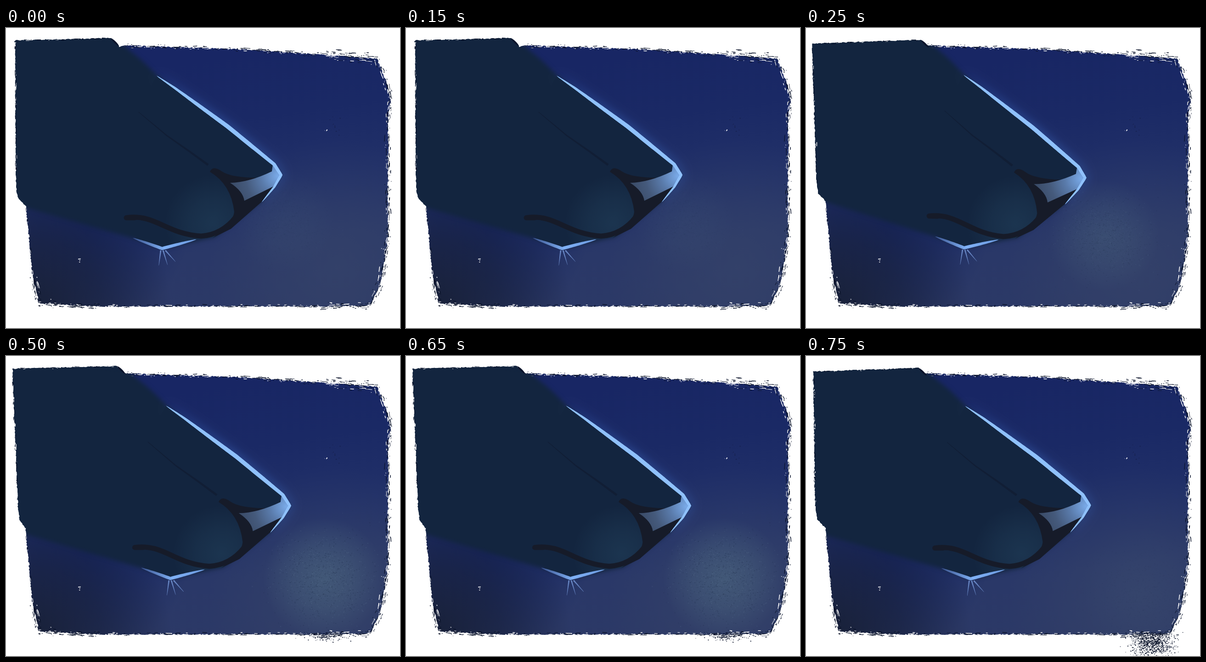
Write an HTML page with a canvas that moves like this. It is 858 px wide and 653 px high and loops after 1 s.

```html
<!DOCTYPE html>
<html lang="en">
<head>
<meta charset="utf-8">
<title>Night muzzle</title>
<style>
html, body { margin: 0; width: 100%; height: 100%; overflow: hidden; background: #fff; }
canvas { display: block; }
</style>
</head>
<body>
<canvas id="stage" width="858" height="653"></canvas>
<script>
const W = 858, H = 653, HOLD = 250;
const INK = '#0b142b', HIDE = '#13253f', DARK = '#161b29', RIM = '#8fc1fc';

// Head shift and turn, neck corners, strength of the breath and of its spill below the panel
const POSES = [
  { shift: [0, 0], turn: 0, top: [20, 27], notch: [228, 22], hip: [22, 346], foot: [43, 387], breath: .13, spill: 0 },
  { shift: [9.3, 0], turn: .029, top: [13, 34], notch: [250, 26], hip: [23, 335], foot: [42, 377], breath: .34, spill: 0 },
  { shift: [19, 4.5], turn: .006, top: [14, 28], notch: [242, 22], hip: [26, 325], foot: [42, 374], breath: .58, spill: 220 },
  { shift: [18.5, 5], turn: 0, top: [16, 34], notch: [245, 26], hip: [20, 322], foot: [42, 373], breath: .1, spill: 1300 }
];

// Panel corners, clockwise; the third value is how ragged the edge after it is
const PANEL = [
  [258, 38, 3], [500, 46, 3.5], [690, 58, 7], [808, 67, 5], [831, 125, 5], [838, 160, 5], [832, 190, 4],
  [832, 460, 5], [816, 555, 6], [793, 604, 5], [690, 606, 2], [200, 606, 5], [72, 599, 6],
  [58, 540, 1], [43, 385, 0], [60, 100, 0]
];

const RIM_LINE = [[328, 104], [368, 131], [482, 214], [584, 297], [599, 320], [584, 346], [557, 379]];
const NECK = new Path2D('M0 0 240 25 295 70 330 104 584 297 600 320 556 378 455 455 340 480 280 459 -30 370Z');
const MUZZLE = new Path2D('M328 104 584 297 599 320 556 379 455 455 413 461 340 480 284 459 230 300Z');
const LIP = new Path2D('M262 413C325 404 350 449 425 453Q470 450 500 412M263 413H280');
const SNOUT = new Path2D('M444 313Q450 298 470 312T552 326L579 311 586 344 556 379 490 437 450 457Q495 425 497 400 490 340 444 313Z');
const NOSE = new Path2D('M488 337Q530 336 579 312L581 297 600 320 586 343 519 376Q516 355 488 337Z');

function rng(seed) {
  return () => {
    seed = seed + 0x6D2B79F5 | 0;
    let t = Math.imul(seed ^ seed >>> 15, 1 | seed);
    t = t + Math.imul(t ^ t >>> 7, 61 | t) ^ t;
    return ((t ^ t >>> 14) >>> 0) / 4294967296;
  };
}
const bell = rand => (rand() + rand() + rand() + rand() - 2) * 1.7;
const swell = w => t => w * Math.sin(Math.PI * t) ** .6;

// Points every few pixels along a polyline
function sample(pts, step) {
  const out = [];
  pts.slice(1).forEach(([x2, y2], i) => {
    const [x, y] = pts[i], n = Math.max(1, Math.round(Math.hypot(x2 - x, y2 - y) / step));
    for (let s = 0; s < n; s++) out.push([x + (x2 - x) * s / n, y + (y2 - y) * s / n]);
  });
  out.push(pts[pts.length - 1]);
  return out;
}

function torn(pts, amp, seed) {
  const rand = rng(seed), path = new Path2D();
  for (const [x, y] of sample([...pts, pts[0]], 3))
    path.lineTo(x + (rand() - .5) * amp, y + (rand() - .5) * amp);
  path.closePath();
  return path;
}

// Band along a polyline whose width follows width(t)
function ribbon(pts, width) {
  const line = sample(pts, 4), last = line.length - 1, left = [], right = [];
  line.forEach(([x, y], i) => {
    const a = line[Math.max(0, i - 1)], b = line[Math.min(last, i + 1)];
    const len = Math.hypot(b[0] - a[0], b[1] - a[1]), w = width(i / last) / 2;
    const nx = (a[1] - b[1]) / len * w, ny = (b[0] - a[0]) / len * w;
    left.push([x + nx, y + ny]);
    right.unshift([x - nx, y - ny]);
  });
  const path = new Path2D();
  [...left, ...right].forEach(p => path.lineTo(...p));
  path.closePath();
  return path;
}

function fill(c, path, style) {
  c.fillStyle = style;
  c.fill(path);
}

function ramp(gradient, ...colors) {
  colors.forEach((col, i) => gradient.addColorStop(i / (colors.length - 1), col));
  return gradient;
}

function glow(c, x, y, r, rgb, alpha) {
  c.fillStyle = ramp(c.createRadialGradient(x, y, 0, x, y, r),
    `rgba(${rgb},${alpha})`, `rgba(${rgb},${alpha * .6})`, `rgba(${rgb},0)`);
  c.fillRect(x - r, y - r, 2 * r, 2 * r);
}

// Thin dry-brush marks: white bites inside the edge, ink around it
function bristle(c, [x1, y1], [x2, y2], spread, density, seed) {
  const rand = rng(seed), len = Math.hypot(x2 - x1, y2 - y1);
  const ux = (x2 - x1) / len, uy = (y2 - y1) / len;
  for (let n = len * spread * density; n > 0; n--) {
    const t = rand() * len, off = bell(rand) * spread * .75;
    const run = 1 + rand() * rand() * 16;
    c.fillStyle = off > 0 && rand() < .45 ? '#fff' : INK;
    c.save();
    c.translate(x1 + ux * t - uy * off, y1 + uy * t + ux * off);
    c.rotate(Math.atan2(uy, ux) + (rand() - .5) * .2);
    c.fillRect(-run / 2, 0, run, .6 + rand());
    c.restore();
  }
}

function specks(c, x, y, sx, sy, count, style, seed, top = 0) {
  const rand = rng(seed);
  c.fillStyle = style;
  while (count-- > 0) {
    const px = x + bell(rand) * sx, py = y + bell(rand) * sy, size = .6 + rand() * 1.2;
    if (py > top) c.fillRect(px, py, size * 1.3, size);
  }
}

function drawPanel(c, panel, breath, i) {
  fill(c, panel, ramp(c.createLinearGradient(540, 50, 620, 606),
    '#182664', '#1a2965', '#213068', '#2a3868', '#2c3966'));
  c.save();
  c.clip(panel);
  glow(c, 720, 520, 280, '62,76,108', .4);
  glow(c, 180, 430, 220, '20,35,95', .85);
  glow(c, 60, 610, 300, '23,31,54', .95);
  const x = 606 + 43 * i, y = 420 + 32 * i, r = 110 + 11 * i;
  glow(c, x, y, r, '78,106,130', breath);
  specks(c, x, y, r * .4, r * .36, 900, `rgba(22,38,62,${breath * .4})`, 71);
  specks(c, x, y, r * .4, r * .36, 600, `rgba(110,140,160,${breath * .3})`, 72);
  specks(c, 714, 210, 9, 12, 12, 'rgba(20,28,64,.6)', 73);
  c.restore();
  PANEL.forEach((p, k) => bristle(c, p, PANEL[(k + 1) % PANEL.length], p[2], .1, 100 + k));
  specks(c, 159, 505, 1, 2, 5, '#fff', 74);
  specks(c, 698, 222, 3, .5, 5, '#fff', 75);
}

function drawFace(c) {
  const rim = ribbon(RIM_LINE, swell(9));
  c.save();
  c.shadowColor = 'rgba(70,120,215,.75)';
  c.shadowBlur = 22;
  fill(c, rim, RIM);
  c.restore();

  fill(c, MUZZLE, HIDE);
  c.save();
  c.clip(MUZZLE);
  glow(c, 450, 425, 105, '36,68,96', .5);
  c.restore();
  fill(c, ribbon([[289, 183], [350, 234], [400, 269], [440, 298]], t => 1 + 4 * t), '#111e35');

  c.strokeStyle = DARK;
  c.lineWidth = 11;
  c.lineCap = 'round';
  c.stroke(LIP);
  fill(c, SNOUT, DARK);
  fill(c, NOSE, ramp(c.createRadialGradient(592, 322, 2, 592, 322, 105),
    '#78a8e6', '#5a7bab', '#455a7c', '#394a66'));
  fill(c, rim, RIM);

  fill(c, ribbon([[276, 457], [340, 480], [415, 460]], swell(7)),
    ramp(c.createLinearGradient(276, 0, 415, 0), '#3c5590', '#7fb0f5', '#6c9ae0'));
  for (let i = 0; i < 3; i++) {
    const x = 337 + 5 * i, a = .43 * i - .13;
    fill(c, ribbon([[x, 484], [x + 33 * Math.sin(a), 484 + 33 * Math.cos(a)]], t => 3 - 2.5 * t), '#6684c2');
  }
}

function drawPose({ shift, turn, top, notch, hip, foot, breath, spill }, i) {
  const sheet = document.createElement('canvas');
  sheet.width = W;
  sheet.height = H;
  const c = sheet.getContext('2d');
  c.fillStyle = '#fff';
  c.fillRect(0, 0, W, H);

  const dip = [notch[0] + 18, notch[1] + 17];
  const border = torn([top, notch, dip, [260, 90], [120, 350], foot, [hip[0] + 4, foot[1] - 17], hip], 2, 20 + i);
  const panel = torn(PANEL, 2.5, 5);
  drawPanel(c, panel, breath, i);
  specks(c, 590 + 54 * i, 587 + 10 * i, 23, 14 * i - 22, spill, INK, 40 + i, 601);
  fill(c, border, HIDE);

  const place = () => {
    c.translate(390 + shift[0], 300 + shift[1]);
    c.rotate(turn);
    c.translate(-390, -300);
  };
  const clip = new Path2D(panel);
  clip.addPath(border);
  c.save();
  c.clip(clip);
  place();
  c.filter = 'blur(5px)';
  fill(c, NECK, HIDE);
  c.restore();

  c.save();
  place();
  drawFace(c);
  c.restore();

  bristle(c, hip, top, 1.3, .1, 60 + i);
  bristle(c, top, notch, 1.2, .1, 64 + i);
  fill(c, ribbon([notch, dip], swell(4)), INK);
  return sheet;
}

const sheets = POSES.map(drawPose);
const stage = document.getElementById('stage').getContext('2d');
const start = performance.now();
let shown = -1;

function tick() {
  const i = Math.floor((performance.now() - start) / HOLD) % sheets.length;
  if (i !== shown) stage.drawImage(sheets[shown = i], 0, 0);
  requestAnimationFrame(tick);
}
tick();
</script>
</body>
</html>
```
